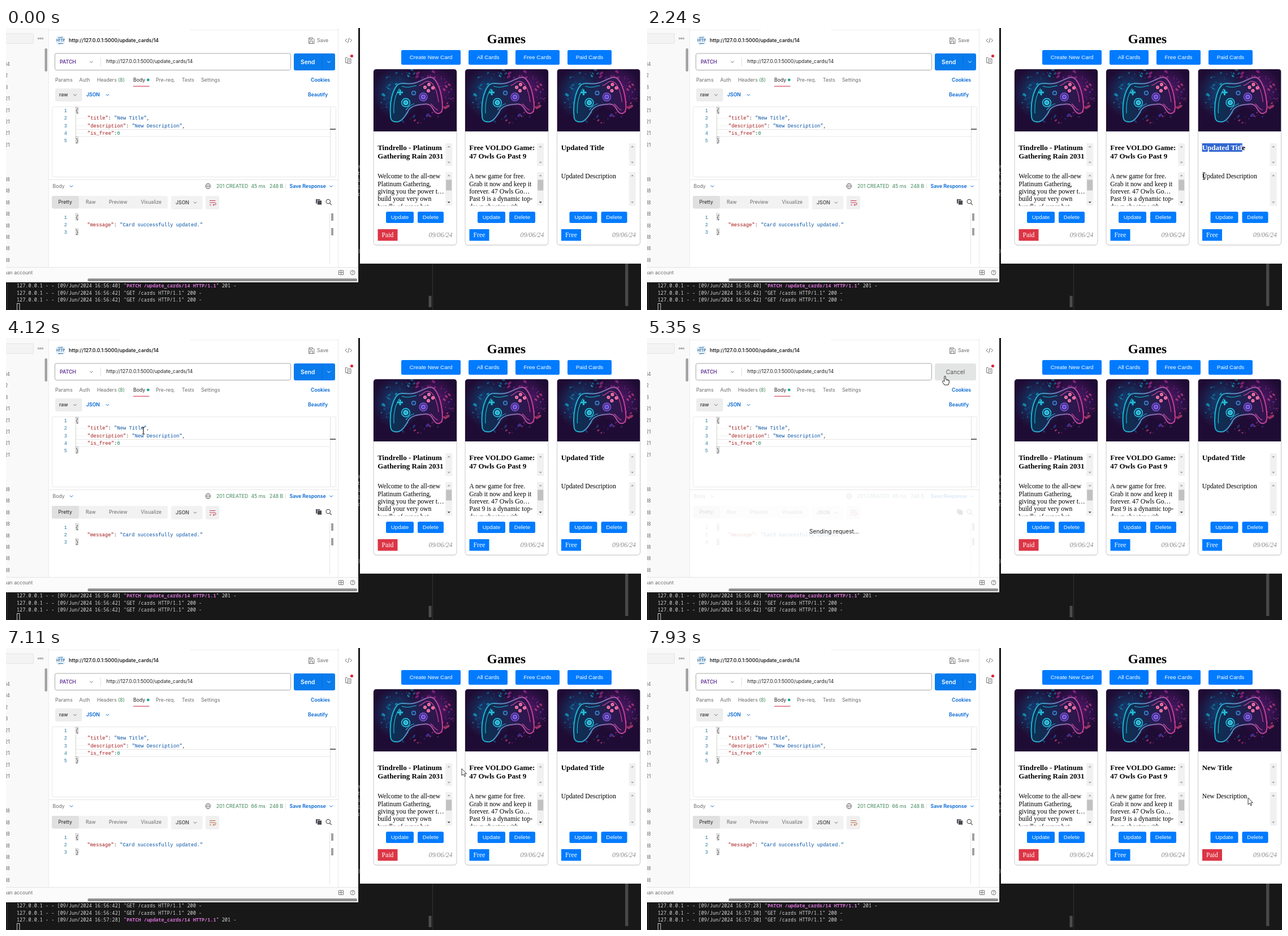
Recreate the animation shown at these times as an HTML page. Size 1123 by 499 pixels, loop 8 s.

```html
<!DOCTYPE html>
<html lang="en">
<head>
<meta charset="utf-8">
<title>Card API demo</title>
<style>
html, body { margin: 0; width: 100%; height: 100%; overflow: hidden; background: #181818; }
svg { display: block; width: 100%; height: 100%; }
text { white-space: pre; font: 8.7px Inter, sans-serif; }
.b { font-weight: 600; }
.big { font-size: 10.2px; }
.code { font: 8.74px "Liberation Mono", monospace; }
.term { font: 8.53px "Noto Sans Mono", monospace; }
.btn { font: 9.8px "Liberation Sans", Arial, sans-serif; }
.serif { font: 11.7px "Liberation Serif", serif; }
.head { font: bold 13px "Liberation Serif", serif; }
.h1 { font: bold 23.2px "Liberation Serif", serif; }
.date { font: italic 11.8px "Liberation Serif", serif; }
</style>
</head>
<body>
<svg id="stage" viewBox="0 0 1123 499"></svg>
<script>
const LOOP = 8000;
const BLUE = '#007bff', LINK = '#0265d2', GREY = '#6b6b6b', INK = '#212121';

// ---- drawing helpers ----
const text = (x, y, s, fill = GREY, cls = '', more = '') =>
  `<text x="${x}" y="${y}" fill="${fill}" class="${cls}" ${more}>${s}</text>`;
const rect = (x, y, w, h, fill, r = 0, more = '') =>
  `<rect x="${x}" y="${y}" width="${w}" height="${h}" fill="${fill}" rx="${r}" ${more}/>`;
const path = (d, stroke, w = 1, fill = 'none') =>
  `<path d="${d}" stroke="${stroke}" stroke-width="${w}" fill="${fill}"/>`;
const chev = (x, y, c = GREY) => path(`M${x - 2.7} ${y - 1.4}l2.7 2.7 2.7-2.7`, c, 1);
const group = (id, body, more = '') => `<g id="${id}" ${more}>${body}</g>`;
const span = (s, c) => `<tspan fill="${c}">${s}</tspan>`;
const END = 'text-anchor="end"', MID = 'text-anchor="middle"';

// ---- controller picture ----
function random(seed) {
  return () => (seed = (seed * 16807) % 2147483647) / 2147483647;
}

function padArt() {
  const rnd = random(77);
  let specks = '';
  for (let i = 0; i < 120; i++) {
    const a = rnd() * 6.283, d = 0.75 + rnd() * 0.5;
    const x = 75 + Math.cos(a) * 54 * d, y = 46 + Math.sin(a) * 40 * d;
    const tone = x < 72 ? ['#0d7fa8', '#15b4d4', '#134f86'] : ['#a12b93', '#d8487e', '#4b3fc0'];
    const r = 0.4 + rnd() * rnd() * 2.4;
    specks += `<ellipse cx="${x.toFixed(1)}" cy="${y.toFixed(1)}" rx="${(r * 1.7).toFixed(1)}" ry="${r.toFixed(1)}"
      fill="${tone[i % 3]}" opacity=".65" transform="rotate(${i % 2 ? -35 : 40} ${x.toFixed(1)} ${y.toFixed(1)})"/>`;
  }
  const dot = (x, y, r, fill, stroke) =>
    `<circle cx="${x}" cy="${y}" r="${r}" fill="${fill}" stroke="${stroke}" stroke-width="1.3"/>`;
  return rect(0, 0, 147, 110, '#1f0c34') +
    `<ellipse cx="42" cy="42" rx="45" ry="46" fill="url(#glowL)"/>
     <ellipse cx="106" cy="36" rx="42" ry="42" fill="url(#glowR)"/>` + specks +
    `<path d="M30 82C28 60 33 38 42 28C48 22 60 27 70 25C82 23 90 15 101 14C112 15 121 40 122 66C122 80 112 82 106 72
      C102 64 98 60 88 62C78 63 68 64 62 72C56 84 48 94 40 93C33 93 30 90 30 82Z"
      fill="url(#shell)" stroke="url(#rim)" stroke-width="1.9"/>` +
    path('M36 78C35 60 39 44 46 34M50 30C62 34 66 30 76 29M57 72C62 66 66 62 72 61', '#1cb8d6', 1.2) +
    path('M92 22C104 18 112 34 115 58M101 61C106 65 109 72 114 72M80 29C86 28 88 24 92 22', '#d23f9c', 1.2) +
    dot(57, 59, 7.5, '#0b4f78', '#27cbe2') + dot(57, 59, 3.6, '#18a6c8', '#6be6f0') +
    dot(88, 49, 7, '#3a2a86', '#8a58dd') + dot(88, 49, 3.3, '#5845c4', '#a67af0') +
    path('M47 36v10M42 41h10', '#22bcd8', 3) + dot(71, 42, 3.4, '#16356a', '#4a8fe0') +
    [[98, 27], [105, 33], [97, 38], [91, 32]].map(p => dot(...p, 2.3, '#e0528f', '#ff86b4')).join('');
}

const gradient = (id, a, b) =>
  `<linearGradient id="${id}"><stop stop-color="${a}"/><stop offset="1" stop-color="${b}"/></linearGradient>`;
const glow = (id, c) =>
  `<radialGradient id="${id}"><stop stop-color="${c}" stop-opacity=".75"/><stop offset="1" stop-color="${c}" stop-opacity="0"/></radialGradient>`;

const defs = `<defs>
  ${gradient('rim', '#18b9d8', '#d23c96')}${gradient('shell', '#0a3253', '#35114c')}
  ${glow('glowL', '#0b5d92')}${glow('glowR', '#6a1f86')}
  <clipPath id="artClip"><path d="M0 110V5Q0 0 5 0H142Q147 0 147 5V110Z"/></clipPath>
  <clipPath id="noteClip"><rect x="0" y="180" width="127" height="61.5"/></clipPath>
  <clipPath id="gapClip"><rect x="623" y="0" width="3" height="499"/></clipPath>
  <clipPath id="selClip"><rect id="selClipBox" y="200" width="0" height="80"/></clipPath>
  <g id="art" clip-path="url(#artClip)">${padArt()}</g></defs>`;

// ---- request editor ----
const line = (y, n, s, x = 123) =>
  text(108, y, n, '#2b7f9e', 'code', END) + text(x, y, s, '#333', 'code');
const key = s => span(`"${s}"`, '#a31515');
const str = s => span(`"${s}"`, '#0451a5');
const brace = (y, c) => rect(123.5, y - 9, 4, 11, 'none', 0, 'stroke="#777" stroke-width=".8" stroke-dasharray="1.6 1"') +
  text(123, y, c, '#222', 'code');
const dots = y => [0, 1, 2, 3].map(i => rect(125.2 + i * 5.24, y - 3, 1, 1, '#c8c8c8')).join('');

function sideList(id, rows) {
  return group(id, rows.map(([y, s]) => text(s.length > 1 ? 6.8 : 3.4, y + 3, s, GREY, '', END)).join(''));
}
const rowsOf = (heads, firstLow) => {
  const step = 20.4, rows = heads.map((s, i) => [64 + i * step, s]);
  for (let i = firstLow; i < 18; i++) rows.push([64 + i * step, '18']);
  return rows;
};

function client() {
  const many = Array(5).fill('21');
  let s = rect(0, 0, 623, 450, '#fff') + rect(0, 0, 75, 423, '#f9f9f9') + rect(-5, 10, 53.5, 17.5, '#f3f3f3', 1, 'stroke="#e4e4e4"');
  s += [57.5, 61, 64.5].map(x => `<circle cx="${x}" cy="18.5" r="1.2" fill="none" stroke="${GREY}" stroke-width=".8"/>`).join('');
  s += rect(68.5, 36, 4.5, 41, '#a3a3a3', 2) + path('M75.5 0V423M587.5 0V423', '#ebebeb') + path('M76 3.5H201M326 3.5H587', '#ececec');
  s += sideList('listA', rowsOf(['14', '2', '3', ...many], 10)) + sideList('listB', rowsOf(['14', '14', '2', '3', ...many], 11));

  // title row
  s += rect(89, 15, 15, 14, '#e4eef8', 3) + path('M92 16.8h8l-1.5-1.5M101 27.5h-8l1.5 1.5', '#1d6fa8', .9) +
    text(96.5, 24.4, 'HTTP', '#1d5f94', 'b', MID + ' style="font-size:5.6px"') +
    text(111, 25.3, 'http://127.0.0.1:5000/update_cards/14', INK, 'b') +
    path('M535.5 17.5h7l2.5 2.5v7.5h-9.500zM537.500 17.500v3h4v-3M537.500 27v-4h5v4', GREY, .9) + text(550, 25.3, 'Save') +
    path('M603 19l-3 3 3 3M608.500 19l3 3-3 3M607 17.500l-2.500 9', GREY, 1) +
    path('M604 52.500h-3.500v9h4M604 54.500h6v8h-6zM605.500 57h3M605.500 59.500h3', GREY, .9) +
    `<circle cx="611.5" cy="49.5" r="2.6" fill="#e0263c"/>`;

  // address row
  s += rect(86.500, 45, 417, 29.500, '#fff', 3, 'stroke="#a8a8a8"') + text(95, 63.200, 'PATCH', '#623497', 'b') + chev(151, 60) +
    path('M167.500 52V68', '#e0e0e0') + text(177.500, 62.300, 'http://127.0.0.1:5000/update_cards/14', INK);
  s += group('send', rect(509, 45, 73, 30, '#097bed', 3) + rect(509, 45, 50, 30, '#0868c9', 3, 'id="hover"') +
    path('M559 46V74', '#0a70d6', .8) + text(521, 63.700, 'Send', '#fff', 'b big') + chev(571, 60, '#fff'));
  s += group('cancel', rect(509, 45, 73, 30, '#e3e4e4', 3) + text(545.500, 63.700, 'Cancel', '#555', 'big', MID));

  // tabs
  for (const [x, t] of [[87, 'Params'], [129.500, 'Auth'], [265, 'Pre-req.'], [311, 'Tests'], [345, 'Settings']]) s += text(x, 95, t);
  s += text(161, 95, 'Headers ' + span('(8)', '#3d8658')) + text(225, 95, 'Body', INK) +
    `<circle cx="251.300" cy="91.800" r="2.400" fill="#1aa398"/>` + rect(225, 102.500, 28.500, 1.200, '#cf4560') +
    text(539, 95, 'Cookies', LINK, 'b') + rect(87, 107, 47.500, 23, '#ededed', 3) + text(94, 121.300, 'raw', '#444', 'b') + chev(122, 118.500) +
    text(142, 121.300, 'JSON', LINK, 'b') + chev(179.500, 118.500, LINK) + text(534, 121.300, 'Beautify', LINK, 'b');

  // body editor
  s += rect(81.500, 139.500, 502, 124, '#fff', 2, 'stroke="#e8e8e8"') + path('M573.500 140V263', '#dedede') +
    path('M123 179.500H573M123 192H573', '#e6e6e6') + path('M123.500 153V193', '#cfd8cf') + rect(573, 178.300, 10, 1.600, '#444') +
    line(149.300, 1, '') + brace(149.300, '{') +
    line(162.400, 2, key('title') + ': ' + str('New Title') + ',', 144) +
    line(175.500, 3, key('description') + ': ' + str('New Description') + ',', 144) +
    line(188.600, 4, key('is_free') + ':' + span('0', '#098658'), 144) +
    line(201.700, 5, '') + brace(201.700, '}') + [162.400, 175.500, 188.600].map(dots).join('');

  // response
  s += path('M76 268.500H587', '#e6e6e6');
  let r = text(82.500, 283, 'Body') + chev(115.500, 280, LINK) +
    `<circle cx="357.300" cy="279.800" r="4.600" fill="none" stroke="${GREY}" stroke-width=".9"/>
     <ellipse cx="357.300" cy="279.800" rx="2" ry="4.600" fill="none" stroke="${GREY}" stroke-width=".8"/>` + path('M352.700 279.800h9.200', GREY, .8) +
    text(372, 283, '201 CREATED', '#3d8658') + text(433.500, 283, '45 ms', '#3d8658', '', 'id="took"') + text(466, 283, '248 B', '#3d8658') +
    path('M494.500 275V285', '#e4e4e4') + text(501.500, 283, 'Save Response', LINK, 'b') + chev(575, 280, LINK) +
    rect(81, 297, 205, 22.500, '#f2f2f2', 3) + rect(81, 297, 48, 22.500, '#e0e0e0', 3) + text(92.500, 311.300, 'Pretty', INK);
  for (const [x, t] of [[141, 'Raw'], [182, 'Preview'], [238.500, 'Visualize']]) r += text(x, 311.300, t);
  r += rect(292, 297, 55.500, 24, '#f2f2f2', 3) + text(300, 312, 'JSON', '#555', 'b') + chev(334.500, 309) + rect(353, 297, 24, 24, '#f0f0f0', 3) +
    `<path id="wrap" d="M360 305.500h10.500M360 309h9q2.300 0 2.300 2t-2.300 2h-3l1.500-1.600m-1.500 1.600l1.500 1.600M360 313h3" fill="none"/>` +
    rect(548, 303, 7.500, 7.500, '#4c4650') + rect(550.500, 305, 8, 8, '#4c4650', 0, 'stroke="#fff" stroke-width=".8"') +
    `<circle cx="569.800" cy="307" r="3.700" fill="none" stroke="#555" stroke-width="1.200"/>` + path('M572.500 309.800l3.300 3.300', '#555', 1.300) +
    line(337.700, 1, '') + brace(337.700, '{') + line(351, 2, key('message') + ': ' + str('Card successfully updated.'), 143.500) +
    line(364, 3, '') + brace(364, '}') + path('M572.500 327V418', '#e4e4e4') + rect(575, 328, 4, 13, '#a0a0a0') + rect(575, 354, 4, 13, '#a0a0a0');
  s += group('resp', r) + group('sending', text(287, 346, 'Sending request...', INK, 'big', 'font-weight="500"'));

  // footer
  s += rect(0, 423, 623, 27, '#fbfbfb') + path('M0 423.500H623', '#e4e4e4') + text(47.300, 436.200, 'nan account', GREY, '', END) +
    path('M588.500 429h8v7.500h-8zM592.500 429v7.500M588.500 432.700h8', GREY, .9) +
    `<circle cx="613" cy="432.800" r="4" fill="none" stroke="${GREY}" stroke-width=".9"/>` + text(613, 435.500, '?', GREY, '', MID + ' style="font-size:7px"') +
    rect(144.500, 443.300, 476.500, 5, '#8d8d8d', 2);
  return s;
}

// ---- card page ----
const button = (x, y, w, h, label) => rect(x, y, w, h, BLUE, 2.500) +
  text(x + w / 2, y + h / 2 + 3.400, label, '#fff', 'btn', MID);
const tag = (label, fill) => rect(7.500, 283, 35, 20.500, fill) + text(25, 297.200, label, '#fff', 'serif', MID);
const paid = tag('Paid', '#dc3545'), free = tag('Free', BLUE);
const tri = (x, y, d, c) => `<path d="M${x - 2.600} ${y + d * 1.300}h5.200L${x} ${y - d * 1.600}z" fill="${c}"/>`;

function bar(y, h, thumb) {
  const x = 127.200;
  return rect(x, y, 12, h, '#f1f1f1') + tri(x + 6, y + 6, 1, '#a3a3a3') + tri(x + 6, y + h - 6, -1, thumb ? '#444' : '#a3a3a3') +
    (thumb ? rect(x + 1, y + 13.500, 10, 19, '#c1c1c1') : '');
}

const heading = rows => rows.map((s, i) => text(7.200, 143 + i * 15.200, s, '#000', 'head')).join('');
const note = rows => `<g clip-path="url(#noteClip)">` + rows.map((s, i) => text(7.200, 193.300 + i * 13.300, s, '#000', 'serif')).join('') + '</g>';

function card(x, content, long) {
  return `<g transform="translate(${x} 73)">` + rect(0, 1.500, 147, 311, '#000', 5, 'opacity=".06"') +
    rect(0, 0, 147, 311, '#fff', 5, 'stroke="#c9c9c9"') + '<use href="#art"/>' + bar(131, 40) + bar(182, 59.500, long) + content +
    button(22, 252, 49, 20, 'Update') + button(78, 252, 46, 20, 'Delete') + text(139.500, 297.200, '09/06/24', '#8c8c8c', 'date', END) + '</g>';
}

function page() {
  return rect(626, 0, 497, 417, '#fff') + path('M626 416H1123', '#e9e9e9') + text(885, 27, 'Games', '#000', 'h1', MID) +
    button(699, 39, 105, 26, 'Create New Card') + button(818, 39, 69, 26, 'All Cards') +
    button(901, 39, 78, 26, 'Free Cards') + button(993, 39, 78, 26, 'Paid Cards') +
    group('cards',
      card(650, heading(['Tindrello - Platinum', 'Gathering Rain 2031']) +
        note(['Welcome to the all-new', 'Platinum Gathering,', 'giving you the power t…', 'build your very own', 'bundle of super hot']) + paid, true) +
      card(812, heading(['Free VOLDO Game:', '47 Owls Go Past 9']) +
        note(['A new game for free.', 'Grab it now and keep it', 'forever. 47 Owls Go…', 'Past 9 is a dynamic top-', 'down shooter with']) + free, true) +
      card(974.500, group('before', heading(['Updated Title']) + note(['Updated Description']) + free) +
        group('after', heading(['New Title']) + note(['New Description']) + paid))) +
    group('sel', rect(981.700, 204, 0, 15, '#3367d1', 0, 'id="selBox"') +
      `<g clip-path="url(#selClip)">${text(981.700, 216, 'Updated Title', '#fff', 'head')}${text(981.700, 266.300, 'Updated Description', '#fff', 'serif')}</g>`);
}

// ---- terminal ----
const log = (time, patch) => `127.0.0.1 - - [09/Jun/2024 ${time}] ` + (patch
  ? `"<tspan fill="#d670d6" font-weight="700">PATCH /update_cards/14 HTTP/1.1</tspan>" 201 -` : '"GET /cards HTTP/1.1" 200 -');
const logs = (id, ...rows) => group(id, rows.map((r, i) => text(19, 459.200 + i * 12.400, r, '#d8d8d8', 'term')).join(''));

function terminal() {
  const a = log('16:56:40', 1), b = log('16:56:42'), c = log('16:57:28', 1), d = log('16:57:30');
  return rect(0, 0, 1123, 499, '#181818') + path('M2.500 450V499', '#2c2c2c') + path('M754.500 417V499', '#333') +
    rect(747.500, 474, 5, 20, '#4c4c4c') + rect(1095, 417, 5.500, 75, '#474747') + rect(19.500, 487.500, 4.500, 13, 'none', 0, 'stroke="#ccc"') +
    `<g clip-path="url(#gapClip)">` + ['e', 't', 'i', 'l', 'r'].map((s, i) => text(621.500, 247.500 + i * 12.400, s, '#999', 'term')).join('') +
    text(622, 398, ')', '#999', 'term') + '</g>' + logs('logA', a, b, b) + logs('logB', b, b, c) + logs('logC', c, d, d);
}

// ---- pointer shapes, hot spot at 0,0 ----
const pointers =
  group('arrow', path('M0 0V12L2.800 9.500 4.700 13.800 6.600 13 4.800 8.800H8.400Z', '#222', .9, '#fff')) +
  group('beam', path('M-2.500 -6H-.5L0 -5.500 .5 -6H2.500M-2.500 6H-.5L0 5.500 .5 6H2.500M0 -5.500V5.500', '#222', 1.200)) +
  group('hand', path('M-1.200 10V1.200Q0 -.8 1.200 1.200V6L3.300 6.400 5.400 7 7.300 8V12L6 16H-1L-4.800 10.500Q-4.500 8.500 -2.800 9Z', '#222', 1, '#fff') +
    path('M3.300 6.500v2.500M5.400 7v2.300', '#222', .7));

const stage = document.getElementById('stage');
stage.innerHTML = defs + terminal() + page() + client() + group('pointer', pointers);
const el = id => document.getElementById(id);
const show = (id, on) => { el(id).style.display = on ? '' : 'none'; };

// ---- timing ----
// bursts of pointer motion: start, end, number of steps
const bursts = [[250, 970, 10], [1060, 1830, 10], [1910, 2560, 9], [2730, 3380, 9], [3630, 4380, 10], [4460, 5260, 11],
  [5350, 5350, 1], [5510, 5600, 2], [6280, 6770, 7], [6940, 7110, 3], [7280, 7360, 2], [7690, 7930, 4]];
// pointer stops: time, x, y
const stops = [[250, 682, 492], [600, 840, 320], [970, 1040, 142], [1060, 1040, 148], [1500, 1010, 195], [1830, 981, 212],
  [1910, 983, 212], [2073, 1053, 212], [2235, 985, 262], [2320, 983, 262], [2560, 1077, 263],
  [2730, 1050, 250], [3140, 402, 100], [3380, 495, 78], [3630, 525, 62], [3960, 255, 150], [4130, 243, 164], [4380, 196, 163],
  [4460, 200, 164], [4800, 300, 178], [5100, 515, 76], [5260, 527, 67], [6279, 527, 67], [6280, 600.500, 114.500],
  [6770, 805, 213], [7110, 806, 213.500], [7690, 830, 218], [7930, 1063, 265]];
const shapes = [[0, ''], [250, 'arrow'], [1740, 'beam'], [2730, 'arrow'], [3630, 'hand'], [3780, 'arrow'], [3950, 'beam'],
  [4930, 'arrow'], [5090, 'hand'], [6280, 'arrow']];

function snap(t) {
  const hit = bursts.filter(b => b[0] <= t).pop();
  if (!hit) return 0;
  const [a, b, n] = hit, step = (b - a) / (n - 1) || 1;
  return a + step * Math.min(n - 1, Math.floor((t - a) / step + 0.2));
}

function place(t) {
  const i = stops.findIndex(s => s[0] > t);
  if (i < 1) return stops[i < 0 ? stops.length - 1 : 0].slice(1);
  const [p, q] = [stops[i - 1], stops[i]];
  const u = (t - p[0]) / (q[0] - p[0]), e = u * u * (3 - 2 * u);
  return [p[1] + (q[1] - p[1]) * e, p[2] + (q[2] - p[2]) * e];
}

function draw(t) {
  const s = snap(t), [x, y] = place(s);
  const shape = shapes.filter(k => k[0] <= s + 1).pop()[1];
  for (const id of ['arrow', 'beam', 'hand']) show(id, id === shape);
  el('pointer').setAttribute('transform', `translate(${x.toFixed(1)} ${y.toFixed(1)})`);

  const sending = t >= 5350 && t < 5510, done = t >= 5510, fresh = t >= 7360;
  show('send', !sending);
  show('cancel', sending);
  show('sending', sending);
  show('hover', shape === 'hand');
  el('resp').setAttribute('opacity', sending ? 0.15 : 1);
  el('took').textContent = done ? '66 ms' : '45 ms';
  el('wrap').setAttribute('stroke', done ? '#b8633c' : '#c23a55');
  show('listA', !done);
  show('listB', done);
  show('logA', !done);
  show('logB', done && !fresh);
  show('logC', fresh);
  show('cards', t < 7280 || fresh);
  show('before', !fresh);
  show('after', fresh);

  // text selection: title first, then the description
  const title = s >= 1910 && s < 2310, about = s >= 2310 && s < 2730;
  const wide = title ? (s < 2073 ? x - 982 : 71) : about ? x - 982 : 0;
  show('sel', wide > 0);
  el('selBox').setAttribute('y', about ? 256 : 204);
  for (const id of ['selBox', 'selClipBox']) el(id).setAttribute('width', Math.max(0, wide));
  el('selClipBox').setAttribute('x', 981.7);
  el('selClipBox').setAttribute('y', about ? 250 : 200);
  el('selClipBox').setAttribute('height', 30);
}

const begin = performance.now();
function tick() {
  draw((performance.now() - begin) % LOOP);
  requestAnimationFrame(tick);
}
tick();
</script>
</body>
</html>
```
